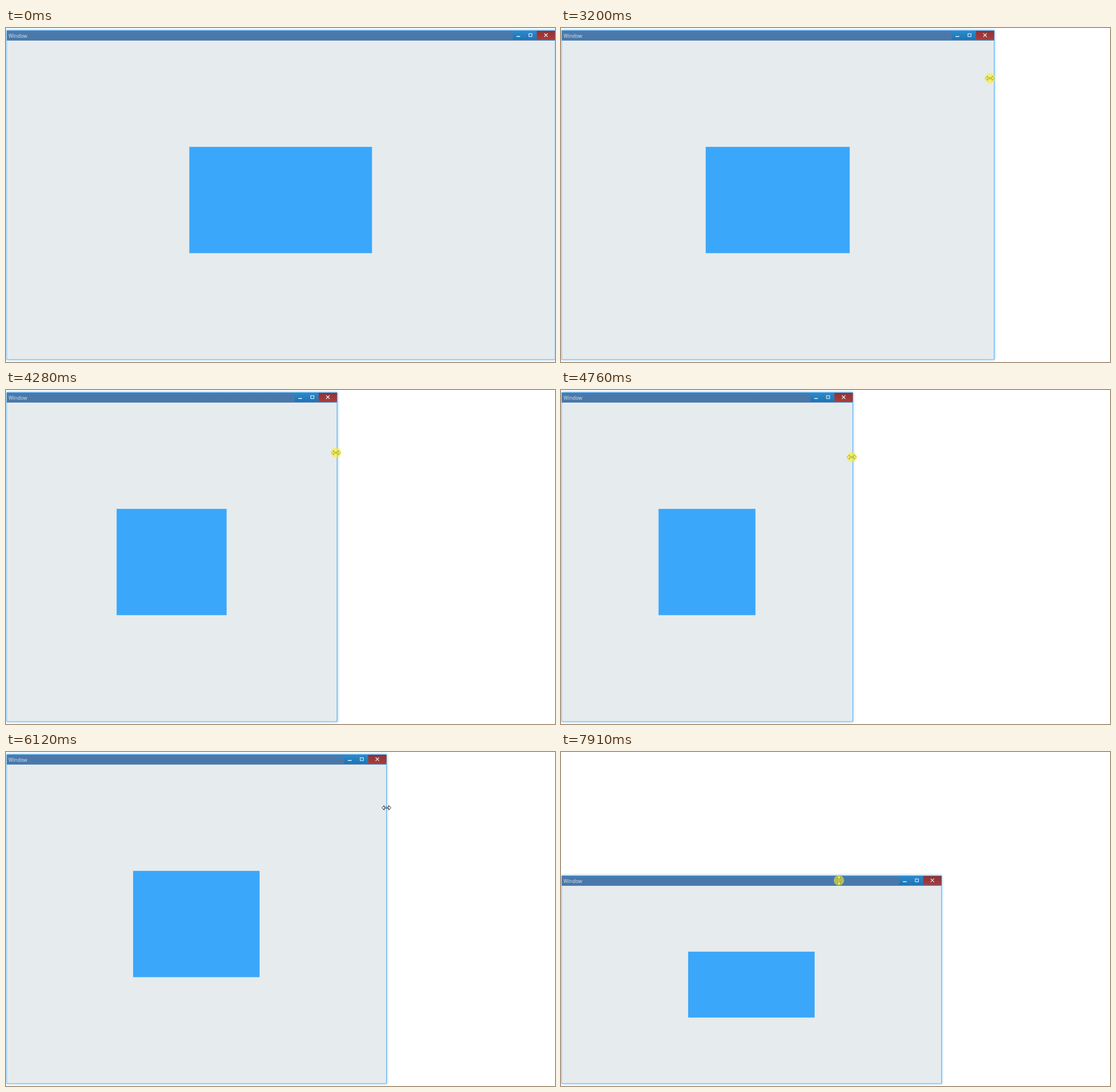
Write an HTML page with a canvas that moves like this. It is 959 px wide and 584 px high and loops after 7.99 s.

```html
<!DOCTYPE html>
<html>
<head>
<meta charset="utf-8">
<title>Window resize</title>
<style>
  html, body { margin: 0; width: 959px; height: 584px; overflow: hidden; background: #fff; }
  canvas { display: block; }
</style>
</head>
<body>
<canvas id="stage" width="959" height="584"></canvas>
<script>
const ctx = document.getElementById('stage').getContext('2d');
const LOOP = 7990, BOTTOM = 580, REFRESH = 77, LAG = 11;

const linear = p => p;
const easeIn = p => p ** 1.3;
const easeOut = p => 1 - (1 - p) ** 3;
const smooth = p => p * p * (3 - 2 * p);
const clamp = (v, lo, hi) => Math.min(hi, Math.max(lo, v));

// Pointer strokes; the pointer rests between them
const origin = { x: 957, y: 53 };
const strokes = [
  { start: 460, end: 780, x: 943, y: 56, ease: easeOut },
  { start: 780, end: 1330, x: 957, y: 62, ease: smooth },
  { start: 2430, end: 2510, x: 959, y: 62, ease: linear },
  { start: 2980, end: 3810, x: 618, y: 104, ease: easeOut },
  { start: 3880, end: 4600, x: 529, y: 116, ease: easeIn },
  { start: 4600, end: 5226, x: 445, y: 121, ease: linear },
  { start: 5226, end: 6120, x: 664.5, y: 97.5, ease: smooth },
  { start: 6445, end: 7110, x: 447, y: 4, ease: smooth },
  { start: 7500, end: 7910, x: 485.5, y: 224.5, ease: p => p ** 1.6 }
];

// Motion is shown at the screen refresh rate
function snap(t) {
  const s = strokes.find(s => t >= s.start && t < s.end);
  if (!s) return t;
  const length = s.end - s.start, step = length / Math.round(length / REFRESH);
  return s.start + step * Math.floor((t - s.start + 12) / step);
}

function pointerAt(t) {
  let { x, y } = origin;
  for (const s of strokes) {
    const p = s.ease(clamp((t - s.start) / (s.end - s.start), 0, 1));
    x += (s.x - x) * p;
    y += (s.y - y) * p;
  }
  return { x, y };
}

function box(x, y, w, h, color) {
  ctx.fillStyle = color;
  ctx.fillRect(x, y, w, h);
}

function fade(y0, y1, from, to) {
  const g = ctx.createLinearGradient(0, y0, 0, y1);
  g.addColorStop(0, from);
  g.addColorStop(1, to);
  return g;
}

function trace(points) {
  ctx.beginPath();
  points.forEach(([x, y]) => ctx.lineTo(x, y));
}

function drawButtons(right, top) {
  const blue = fade(top, top + 15, '#2b8acb', '#1b74b8');
  const red = fade(top, top + 15, '#8f3236', '#a83c3c');
  box(right - 74.5, top, 20.5, 15.3, blue);
  box(right - 53.5, top, 20.5, 15.3, blue);
  box(right - 32.5, top, 32, 15.3, red);

  const x = right - 16.5, y = top + 7.5;
  box(right - 68, y + 1.5, 6.5, 1.5, '#e4f1fa');
  ctx.strokeStyle = '#e4f1fa';
  ctx.lineWidth = 1.1;
  ctx.strokeRect(right - 46.3, y - 2.5, 5.4, 5);
  for (const d of [-3, 3]) {
    trace([[x - 3, y - d], [x + 3, y + d]]);
    ctx.stroke();
  }
}

function drawWindow(right, top) {
  ctx.save();
  ctx.shadowColor = '#63b8f8';
  ctx.shadowBlur = 4;
  box(1, top, right - 1, BOTTOM - top, '#58aff0');
  ctx.restore();
  box(1.5, top + .7, right - 2.5, 17.3, fade(top, top + 4, '#3f80bd', '#4a78aa'));
  box(1.5, top + 18, right - 2.5, BOTTOM - top - 18.7, '#e6ebee');

  ctx.fillStyle = '#dde7f0';
  ctx.font = '8.6px "Open Sans", sans-serif';
  ctx.fillText('Window', 4.5, top + 13);
  drawButtons(right, top + 1);

  // The panel fills the middle third of the client area
  const w = (right - 2.5) / 3, h = (BOTTOM - top - 18.5) / 3;
  box(w + 1.2, top + 18 + h, w, h, '#3aa7fa');
}

const arrowShape = [[0, 0], [0, 12.5], [2.8, 9.8], [4.8, 14], [6.6, 13.2], [4.8, 9.2], [8.6, 9]];
const resizeHalf = [[-4, 1], [-4, 4], [-8, 0], [-4, -4], [-4, -1]];
const resizeShape = [...resizeHalf, ...resizeHalf.map(([x, y]) => [-x, -y])];

function drawPointer(t) {
  if (t < 540 || (t >= 1330 && t < 2110)) return;
  const arrow = t < 2510 || (t >= 6510 && t < 7100);
  const pressed = (t >= 2900 && t < 6120) || t >= 7420;
  const { x, y } = pointerAt(t);
  ctx.save();
  ctx.translate(x, y);
  if (t >= 7100) ctx.rotate(Math.PI / 2);
  trace(arrow ? arrowShape : resizeShape);
  ctx.closePath();
  ctx.fillStyle = '#fff';
  ctx.fill();
  ctx.strokeStyle = '#111';
  ctx.lineWidth = .9;
  ctx.stroke();
  if (pressed) {
    ctx.beginPath();
    ctx.arc(0, 0, 9, 0, 2 * Math.PI);
    ctx.fillStyle = 'rgba(248, 240, 40, .6)';
    ctx.fill();
  }
  ctx.restore();
}

function draw(now) {
  const t = snap(now % LOOP);
  // The dragged edges trail the pointer slightly
  const right = pointerAt(clamp(t - LAG, 2900, 6120)).x + .7;
  const top = pointerAt(clamp(t - LAG, 7420, LOOP)).y;
  box(0, 0, 959, 584, '#fff');
  drawWindow(right, top);
  drawPointer(t);
  requestAnimationFrame(draw);
}
requestAnimationFrame(draw);
</script>
</body>
</html>
```
